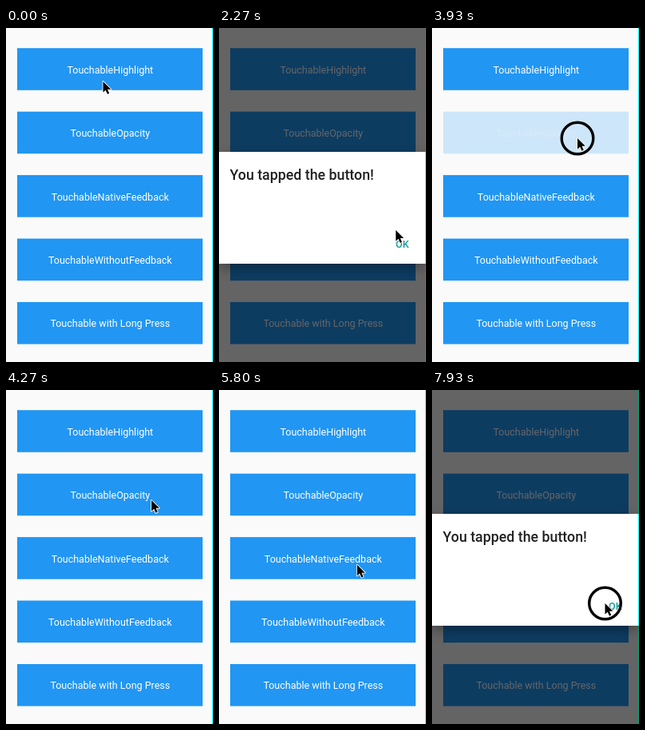
Recreate the animation shown at these times as an HTML page with a canvas. Size 259 by 418 pixels, loop 8000 ms.

```html
<!DOCTYPE html>
<html lang="en">
<head>
<meta charset="utf-8">
<title>Touchables</title>
<style>
  html, body { margin: 0; width: 100%; height: 100%; overflow: hidden; background: #fafafa; }
  canvas { display: block; width: 259px; height: 418px; }
</style>
</head>
<body>
<canvas id="stage"></canvas>
<script>
const W = 259, H = 418, LOOP = 8000;
const canvas = document.getElementById('stage');
const ctx = canvas.getContext('2d');
const ratio = window.devicePixelRatio || 1;
canvas.width = W * ratio;
canvas.height = H * ratio;

const FONT = 'Roboto, "Noto Sans", sans-serif';
const LABELS = [
  'TouchableHighlight',
  'TouchableOpacity',
  'TouchableNativeFeedback',
  'TouchableWithoutFeedback',
  'Touchable with Long Press'
];
const BUTTON = { x: 14, y: 25.2, w: 232, h: 52.6, step: 79.45 };
const MAX_DIM = 0.6;
const HOME = { x: 121.5, y: 66 };

// One tap per button: press and release it, then confirm the dialog.
const highlight = {
  spot: { x: 192, y: 49.5 }, ok: { x: 222.5, y: 262 },
  travel: 900, press: 930, release: 1180, close: 2850
};
const opacity = {
  spot: { x: 182, y: 138 }, ok: { x: 222.5, y: 262 },
  travel: 300, press: 3300, release: 4000, close: 5340
};
const ripple = {
  spot: { x: 165, y: 212 }, ok: { x: 216.5, y: 267 },
  travel: 950, press: 6480, release: 6960, close: 8145
};
const TAPS = [highlight, opacity, ripple];
TAPS.forEach((tap, i) => { tap.open = 1290 + 3027 * i; });

const ramp = (t, from, duration) => Math.min(1, Math.max(0, (t - from) / duration));
const easeOut = p => 1 - (1 - p) ** 3;
const mix = (a, b, p) => a + (b - a) * p;
const between = (t, from, to) => t >= from && t < to;
const isPressed = (tap, t) => between(t, tap.press, tap.release);
const toward = (a, b, p) => ({ x: mix(a.x, b.x, p), y: mix(a.y, b.y, p) });

const dialogAlpha = t => TAPS.reduce((sum, tap) =>
  sum + ramp(t, tap.open, 110) - ramp(t, tap.close, 160), 0);

const dimLevel = t => TAPS.reduce((sum, tap) =>
  sum + ramp(t, tap.open, 185) - ramp(t, tap.close + 65, 190), 0);

function pointerAt(t) {
  let pos = HOME, leave = 0;
  for (const tap of TAPS) {
    const life = tap.close - tap.open;
    pos = toward(pos, tap.spot, easeOut(ramp(t, leave, tap.travel)));
    pos = toward(pos, tap.ok, easeOut(ramp(t, tap.open + life * 0.42, life * 0.32)));
    leave = tap.close;
  }
  // The opening move sweeps down past all buttons and back.
  const sweep = Math.sin(Math.PI * ramp(t, 0, highlight.travel));
  return { x: pos.x - 75 * sweep, y: pos.y + 295 * sweep };
}

function text(str, x, y, font, color, align = 'left') {
  ctx.font = `${font} ${FONT}`;
  ctx.fillStyle = color;
  ctx.textAlign = align;
  ctx.fillText(str, x, y);
}

function drawRipple(t, y) {
  const { spot, press, release } = ripple;
  const tint = 0.14 * (1 - ramp(t, release, 420));
  ctx.save();
  ctx.beginPath();
  ctx.rect(BUTTON.x, y, BUTTON.w, BUTTON.h);
  ctx.clip();
  ctx.fillStyle = `rgba(0,0,0,${tint})`;
  ctx.beginPath();
  ctx.arc(spot.x, spot.y, 190 * ramp(t, press, 250), 0, Math.PI * 2);
  ctx.fill();
  ctx.restore();
}

function drawButton(label, i, t) {
  const { x, w, h } = BUTTON;
  const y = BUTTON.y + i * BUTTON.step;
  ctx.save();
  if (i === 0 && isPressed(highlight, t)) {
    ctx.fillStyle = '#fff';
    ctx.fillRect(x, y, w, h);
    ctx.globalAlpha = 0.85;
  }
  if (i === 1) {
    const faded = ramp(t, opacity.press, 100) - ramp(t, opacity.release, 220);
    ctx.globalAlpha = 1 - 0.8 * faded;
  }
  ctx.fillStyle = '#2196f3';
  ctx.fillRect(x, y, w, h);
  if (i === 2) drawRipple(t, y);
  text(label, 130.3, y + 31.4, '12.5px', '#fff', 'center');
  ctx.restore();
}

function drawEdge(y, h, dim) {
  ctx.fillStyle = `rgb(0,${mix(255, 160, dim)},${mix(255, 115, dim)})`;
  ctx.fillRect(258, y, 1, h);
}

function drawDialog(alpha) {
  if (alpha <= 0) return;
  ctx.save();
  ctx.globalAlpha = alpha;
  ctx.shadowColor = 'rgba(0,0,0,0.35)';
  ctx.shadowBlur = 14 * ratio;
  ctx.shadowOffsetY = 5 * ratio;
  ctx.fillStyle = '#fff';
  ctx.fillRect(0, 155, 258, 140);
  ctx.shadowColor = 'transparent';
  text('You tapped the button!', 13.5, 190, '500 17.8px', '#212121');
  text('OK', 221, 275, '500 12.5px', '#169a9a');
  drawEdge(155, 140, 0);
  ctx.restore();
}

function drawPointer(t) {
  const { x, y } = pointerAt(t);
  const clicking = TAPS.some(tap =>
    isPressed(tap, t) || between(t, tap.close - 230, tap.close - 30));
  if (clicking) {
    ctx.beginPath();
    ctx.arc(x, y, 19.8, 0, Math.PI * 2);
    ctx.strokeStyle = '#000';
    ctx.lineWidth = 3.4;
    ctx.stroke();
  }
  ctx.save();
  ctx.translate(x, y);
  ctx.scale(0.88, 0.88);
  const arrow = new Path2D('M0 0V15.5L3.6 12.2L6.2 18L8.8 16.9L6.3 11.2H11.2Z');
  ctx.lineJoin = 'round';
  ctx.lineWidth = 2;
  ctx.strokeStyle = '#fff';
  ctx.stroke(arrow);
  ctx.fillStyle = '#000';
  ctx.fill(arrow);
  ctx.restore();
}

function draw(t) {
  const dim = dimLevel(t);
  ctx.setTransform(ratio, 0, 0, ratio, 0, 0);
  ctx.fillStyle = '#fafafa';
  ctx.fillRect(0, 0, W, H);
  LABELS.forEach((label, i) => drawButton(label, i, t));

  ctx.fillStyle = `rgba(0,0,0,${MAX_DIM * dim})`;
  ctx.fillRect(0, 0, W, H);
  drawEdge(0, H, dim);
  drawDialog(dialogAlpha(t));
  drawPointer(t);
}

const start = performance.now();
function tick() {
  draw((performance.now() - start) % LOOP);
  requestAnimationFrame(tick);
}
tick();
</script>
</body>
</html>
```
